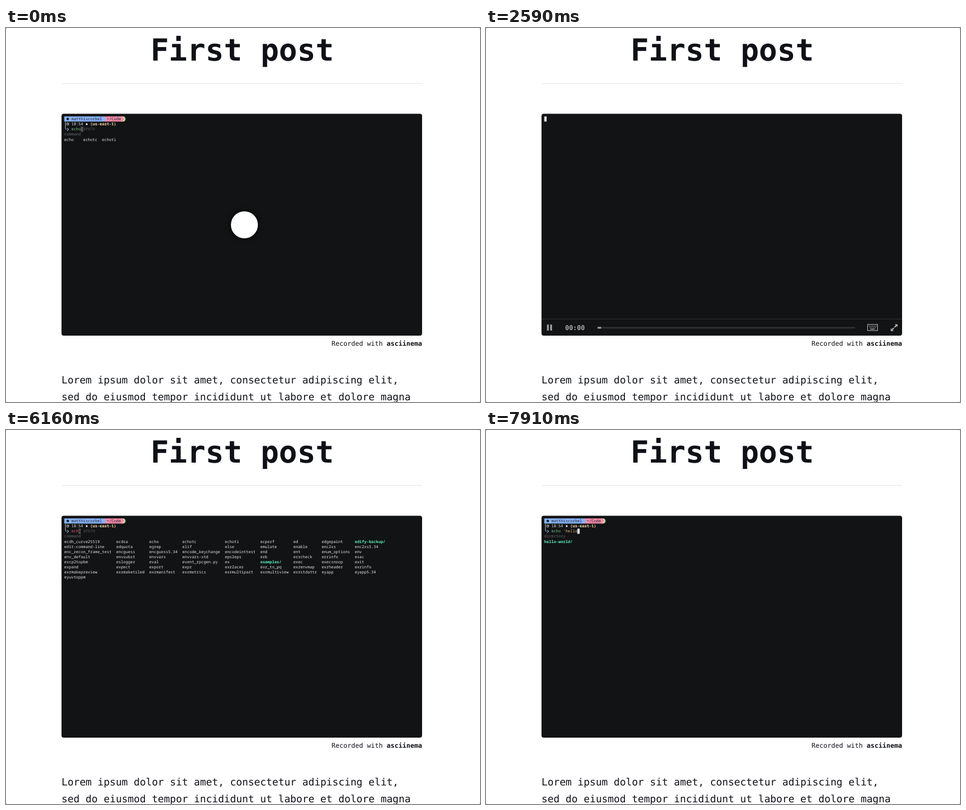
Recreate the animation shown at these times as an HTML page. Size 843 by 665 pixels, loop 8000 ms.

```html
<!DOCTYPE html>
<html lang="en">
<head>
<meta charset="utf-8">
<title>First post</title>
<style>
html, body { margin: 0; width: 100%; height: 100%; overflow: hidden; background: #8a8a8a; }
svg { display: block; }
text { white-space: pre; text-rendering: geometricPrecision; font-family: "DejaVu Sans Mono", monospace; fill: #0f1117; }
.term text { font: 7px "Noto Sans Mono", monospace; }
.term .b { font-weight: 700; }
.bold { font-weight: 700; }
.logo { filter: drop-shadow(0 0 4px #000); }
</style>
</head>
<body>
<svg width="843" height="665" viewBox="0 0 843 665">
  <rect width="843" height="665" rx="2" fill="#fff"/>
  <text class="bold" x="257" y="58" font-size="54.2">First post</text>
  <path d="M99 98.5H740" stroke="#e5e6e8"/>
  <rect x="98.7" y="152.6" width="641.3" height="394.4" rx="4" fill="#121314"/>
  <g class="term" id="screen"></g>
  <circle class="logo" id="logo" cx="424" cy="350" r="24" fill="#fff"/>
  <g id="bar" fill="#aaa">
    <path d="M99 517.5H740" stroke="#333435"/>
    <path id="icon"/>
    <text id="clock" class="bold" x="140.8" y="537" font-size="11.63" style="fill:#aaa"></text>
    <rect x="198.5" y="531.6" width="458" height="2.8" fill="#303132"/>
    <rect id="fill" x="198.5" y="531.6" height="2.8"/>
    <rect x="678.6" y="527.1" width="17.8" height="10.8" fill="none" stroke="#aaa" stroke-width="1.2"/>
    <path d="M681 530.2H694.5M682.5 532.7H693" fill="none" stroke="#aaa" stroke-width="1.4" stroke-dasharray="1.4 1.6"/>
    <path d="M683.5 535.4H691.5" stroke="#aaa" stroke-width="1.4"/>
    <path d="M726.8 526.7H732V531.9L730.2 530.1L727.3 533L725.7 531.4L728.6 528.5ZM725 538.9H719.8V533.7L721.6 535.5L724.5 532.6L726.1 534.2L723.2 537.1Z"/>
  </g>
  <text x="579" y="565" font-size="11.63">Recorded with <tspan class="bold">asciinema</tspan></text>
  <text x="98.8" y="631.6" font-size="17.79">Lorem ipsum dolor sit amet, consectetur adipiscing elit,</text>
  <text x="98.8" y="662" font-size="17.79">sed do eiusmod tempor incididunt ut labore et dolore magna</text>
</svg>
<script>
const $ = id => document.getElementById(id);
const LOOP = 8000, CW = 4.2, RH = 9.13, X0 = 103.6, Y0 = 157.2;
const C = { white: "#e2e4e8", grey: "#686a6c", dim: "#505253", mint: "#56f0b8", green: "#82c985",
  red: "#ee5c78", tan: "#d6b57a", blue: "#89b4fa", pink: "#f38ba8", lime: "#a6e3a1", cream: "#f9e2af", ink: "#1a1b26" };

const cx = col => X0 + col * CW;
const cy = row => Y0 + row * RH;
const put = (row, col, str, color = C.white, bold = false) =>
  `<text x="${cx(col)}" y="${cy(row) + 6.8}" style="fill:${color}"${bold ? ' class="b"' : ""}>${str}</text>`;
const cell = (row, col, color, ch = "") =>
  `<rect x="${cx(col)}" y="${cy(row)}" width="${CW}" height="${RH}" fill="${color}"/>` + put(row, col, ch, "#121314");

const grid = (top, cols, lines) => lines.map((line, r) => line.split(" ").map((word, i) => {
  const dir = word.endsWith("/");
  return put(top + r, cols[i], word, dir ? C.mint : C.white, dir);
}).join("")).join("");

const commands = put(3, 0, "command", C.grey) + grid(4, [0, 22, 36, 50, 68, 83, 97, 109, 123], [
  "ecdh_curve25519 ecdsa echo echotc echoti ecperf ed edgepaint edify-backup/",
  "edit-command-line edquota egrep elif else emulate enable enc2xs enc2xs5.34",
  "enc_recon_frame_test encguess encguess5.34 encode_keychange encodeinttest end ent enum_options env",
  "env_default envsubst envvars envvars-std eps2eps erb errcheck errinfo esac",
  "escp2topbm eslogger eval event_rpcgen.py ex examples/ exec execsnoop exit",
  "expand expect export expr exr2aces exr_to_pq exrenvmap exrheader exrinfo",
  "exrmakepreview exrmaketiled exrmanifest exrmetrics exrmultipart exrmultiview exrstdattr eyapp eyapp5.34",
  "eyuvtoppm"]);
const echoes = put(3, 0, "command", C.grey) + grid(4, [0, 8, 16], ["echo echotc echoti"]);
const folders = put(3, 0, "directory", C.grey) + grid(4, [0, 23, 46, 69, 92, 115], [
  "DOOM-3-master/ LazyVim/ SillyTavern/ SillyTavern-Launcher/ Youtube/ alfred/",
  "catalyst-ui-kit/ cswebsites-root/ edify-backup/ examples/ hello-world/ learning/",
  "lily58-zmk/ mpblog-presentation/ portfolio/ rust/ mcorbel-blog/ mcorbel-journal/",
  "starter/ stow.nvim/ tailwind-templates/ testJs/ tests/ timeclockwatch/",
  "trading-ai-bot/ ttsreader/ tui-json-editor/ tui-recordings/ tui-todo/ vite-project/"]) +
  put(9, 0, "file", C.grey) + put(10, 0, "Icon^M") + put(10, 69, "test.cast");
const common = folders + put(11, 0, "common substring:", C.white, true) + cell(11, 18, "#e3b04f", "'");
const hello = put(3, 0, "directory", C.grey) + grid(4, [0], ["hello-world/"]);

const box = (x, w, color) => `<rect x="${x}" y="${Y0}" width="${w}" height="${RH}" fill="${color}"/>`;
const prompt = box(204, 5, C.lime) +
  `<path d="M208 ${Y0}a4.8 4.57 0 0 1 0 ${RH}z" fill="${C.lime}"/>` +
  box(174, 33, C.pink) + `<path d="M207 ${Y0}l3 4.57l-3 4.56z" fill="${C.pink}"/>` +
  box(X0, 71, C.blue) + `<path d="M174.6 ${Y0}l2.8 4.57l-2.8 4.56z" fill="${C.blue}"/>` +
  `<circle cx="109.8" cy="161.8" r="2.3" fill="${C.ink}"/>` +
  put(0, 3, "matthiscorbel", C.ink) + put(0, 18, "•/Code", C.ink) +
  `<g fill="none" stroke-width=".8"><path d="M105.7 167V178.4Q105.7 180.3 108 180.3" stroke="${C.white}"/>
   <path d="M109.8 168.8V170.8H111.3" stroke="${C.white}" stroke-width=".6"/>
   <circle cx="109.8" cy="170.7" r="2.1" stroke="${C.white}"/>
   <path d="M108.6 177.8L111.2 180.3L108.6 182.8" stroke="${C.blue}" stroke-width="1.1"/></g>` +
  put(1, 3, "18:54") + `<circle cx="143.5" cy="170.9" r="1.7" fill="${C.white}"/>` +
  put(1, 11, "(us-east-1)", C.cream, true);

// Command line with typed text, cursor and greyed suggestion.
function shell(typed, hint = "", list = "", cursor = true) {
  const end = 3 + typed.length;
  const cmd = typed.slice(0, 4);
  return prompt + list + put(2, 3, cmd, cmd === "echo" ? C.green : C.red) +
    put(2, 8, typed.slice(5), C.tan) +
    (cursor ? cell(2, end, hint ? C.dim : C.white, hint[0]) : "") +
    put(2, end + 1, hint.slice(1), C.dim);
}

const url = "https://wiki.archlinux.org/index.php/rEFInd'";
const scenes = [
  [0, shell("echo", " $PATH", echoes)],
  [2520, cell(0, 0, C.white)],
  [3500, put(0, 0, "~/Code") + cell(0, 6, C.white)],
  [3640, shell("")],
  [5180, shell("", "", "", false)],
  [5670, shell("")],
  [5950, shell("e", "cho $PATH")],
  [6020, shell("e", "cho $PATH", commands)],
  [6090, shell("ec", "ho $PATH", commands)],
  [6160, shell("ech", "o $PATH", commands)],
  [6230, shell("ech", "o $PATH", echoes)],
  [6580, shell("echo", " $PATH", echoes)],
  [6650, shell("echo ", "$PATH", echoes)],
  [6720, shell("echo ", "$PATH", folders)],
  [6930, shell("echo '", url, folders)],
  [7000, shell("echo '", url, common)],
  [7280, shell("echo 'h", url.slice(1), common)],
  [7350, shell("echo 'h", url.slice(1), hello)],
  [7420, shell("echo 'he", "lper'", hello)],
  [7560, shell("echo 'hel", "per'", hello)],
  [7700, shell("echo 'hell", "", hello)],
  [7910, shell("echo 'hello", "", hello)]
];
const ticks = [2590, 2730, 2800, 2940, 3010, 3150, 3290, 3360, 3500, 3570];
const fades = [[0, 0], [2100, .45], [2170, .8], [2240, 1], [3640, .45], [3710, 0]];
const at = (list, t) => list.findLast(item => item[0] <= t)[1];

let shown;
function render(t) {
  const scene = at(scenes, t);
  if (scene !== shown) $("screen").innerHTML = shown = scene;
  $("logo").style.display = t < 2520 ? "" : "none";
  $("bar").setAttribute("opacity", at(fades, t));
  $("icon").setAttribute("d", t < 2590 ? "M108.4 527.4L117.8 532.7L108.4 538Z"
    : "M108.6 527.3h3v10.8h-3zM114.3 527.3h3v10.8h-3z");
  $("clock").textContent = t < 3500 ? "00:00" : "00:01";
  $("fill").setAttribute("width", ticks.filter(k => k <= t).length * 6.2);
}

let start;
function frame(now) {
  start ??= now;
  render((now - start) % LOOP);
  requestAnimationFrame(frame);
}
render(0);
requestAnimationFrame(frame);
</script>
</body>
</html>
```
